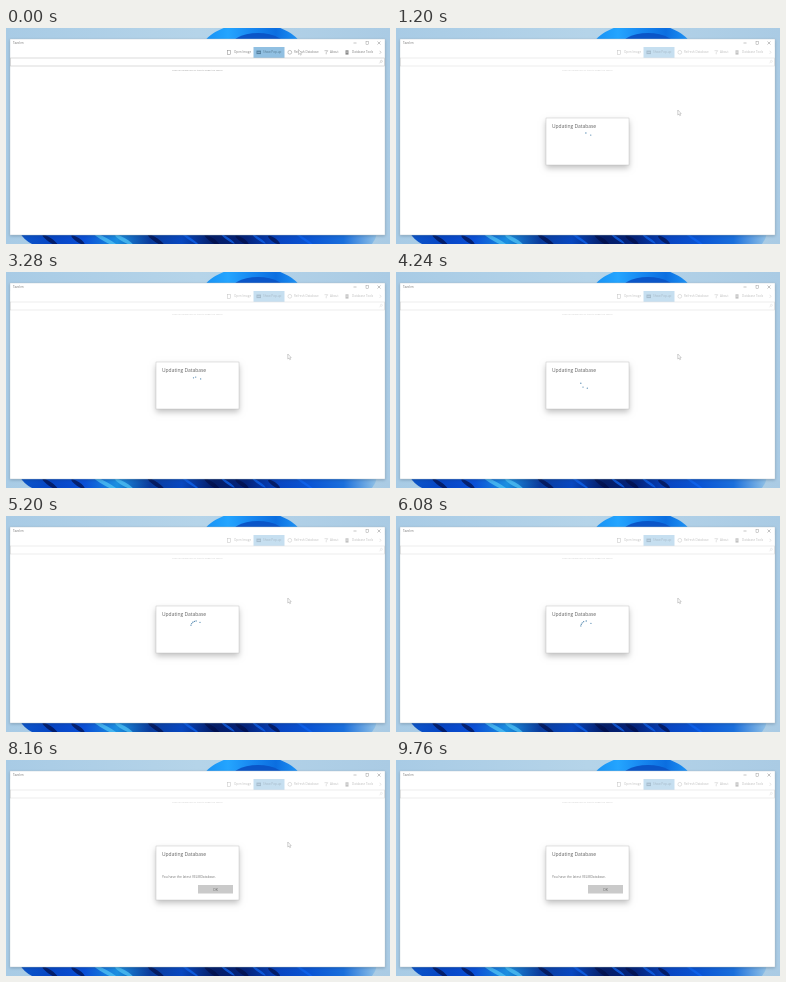
An HTML page with a canvas that plays this animation: 384x216 px, repeating every 9840 ms.

```html
<!DOCTYPE html>
<html lang="en">
<head>
<meta charset="utf-8">
<title>Database update</title>
<style>
html, body { margin: 0; width: 100%; height: 100%; overflow: hidden; }
canvas { display: block; width: 384px; height: 216px; }
</style>
</head>
<body>
<canvas id="stage" width="384" height="216"></canvas>
<script>
const ctx = document.getElementById("stage").getContext("2d");
const LOOP = 9840, STEP = 80;
const OPEN = 640, DONE = 7600, CURSOR_GONE = 9360;
const clamp = v => Math.max(0, Math.min(1, v));
const ease = v => v * v * (3 - 2 * v);
const mix = (a, b, v) => a + (b - a) * v;

// Linear track through [position, value] keys; null outside its range.
function track(keys, at) {
  const i = keys.findIndex(k => k[0] > at);
  if (i < 1) return null;
  const [p0, v0] = keys[i - 1], [p1, v1] = keys[i];
  return mix(v0, v1, (at - p0) / (p1 - p0));
}

function rect(x, y, w, h, color) {
  ctx.fillStyle = color;
  ctx.fillRect(x, y, w, h);
}

function box(x, y, w, h, color, width = 0.6) {
  ctx.strokeStyle = color;
  ctx.lineWidth = width;
  ctx.strokeRect(x, y, w, h);
}

function line(color, width, ...points) {
  ctx.beginPath();
  points.forEach(([x, y]) => ctx.lineTo(x, y));
  ctx.strokeStyle = color;
  ctx.lineWidth = width;
  ctx.stroke();
}

function ring(x, y, r, color, width) {
  ctx.beginPath();
  ctx.arc(x, y, r, 0, 7);
  ctx.strokeStyle = color;
  ctx.lineWidth = width;
  ctx.stroke();
}

function text(str, x, y, size, color, align = "left") {
  ctx.font = `${size}px "Open Sans", sans-serif`;
  ctx.textAlign = align;
  ctx.fillStyle = color;
  ctx.fillText(str, x, y);
}

function ellipse(x, y, rx, ry, tilt, fill) {
  ctx.beginPath();
  ctx.ellipse(x, y, rx, ry, tilt, 0, 7);
  ctx.fillStyle = fill;
  ctx.fill();
}

function gradient(x0, x1, colors) {
  const g = ctx.createLinearGradient(x0, 0, x1, 0);
  colors.forEach((c, i) => g.addColorStop(i / (colors.length - 1), c));
  return g;
}

function shadow(color, blur, dy) {
  ctx.shadowColor = color;
  ctx.shadowBlur = blur;
  ctx.shadowOffsetY = dy;
}

function wallpaper() {
  rect(0, 0, 384, 216, gradient(0, 384, ["#a8cbe5", "#b5d4e9", "#aacbe4"]));
  ellipse(246, 26, 52, 31, 0, gradient(198, 294, ["#1590f4", "#24a5ff", "#1787f0", "#0b6ee0", "#1f97f8"]));
  ellipse(252, 22, 30, 17, 0, "#0a55c8");
  ctx.save();
  ctx.beginPath();
  ctx.moveTo(14, 205);
  ctx.quadraticCurveTo(18, 212, 26, 216);
  ctx.lineTo(366, 216);
  ctx.quadraticCurveTo(370, 211, 371, 205);
  ctx.clip();
  rect(10, 205, 365, 11, gradient(14, 370, [
    "#0b55c9", "#0645c4", "#0a4fd6", "#1b8fe0", "#0a3c9c",
    "#0747c0", "#041c66", "#03237c", "#0845c2", "#0a55d4", "#1a6fdc", "#8fc0e6"
  ]));
  [[44, 9], [72, 8], [150, 10], [206, 9], [236, 8], [268, 7]].forEach(([x, w]) =>
    ellipse(x, 212, w, 2, 0.6, "rgba(2,14,70,.7)"));
  [[100, 14], [118, 10]].forEach(([x, w]) =>
    ellipse(x, 212, w, 2, 0.5, "rgba(80,195,245,.75)"));
  [[184, 10], [222, 8], [253, 8], [298, 14]].forEach(([x, w]) =>
    ellipse(x, 211, w, 1.2, 0.6, "rgba(15,100,240,.75)"));
  ctx.restore();
}

function icon(kind, x, y) {
  const c = "#888";
  if (kind === "page") {
    box(x + 0.7, y - 2, 3, 4.2, c, 0.5);
  } else if (kind === "panel") {
    rect(x, y - 1.7, 4.5, 3.5, "#537f9f");
    rect(x + 0.8, y - 0.4, 3, 0.7, "#9bc2df");
  } else if (kind === "refresh") {
    ring(x + 2, y, 1.9, c, 0.5);
  } else if (kind === "about") {
    line(c, 0.5, [x, y - 1.6], [x + 3.2, y - 1.6], [x + 1.7, y + 0.4], [x + 1.7, y + 2]);
  } else {
    rect(x + 0.5, y - 2, 3, 4.3, c);
    rect(x + 0.8, y - 0.5, 2.4, 0.5, "#fff");
  }
}

function appWindow(dim) {
  ctx.save();
  shadow("rgba(20,50,80,.3)", 3, 1);
  rect(4, 11, 375, 196, "#fff");
  ctx.restore();
  box(4, 11, 375, 196, "#b4c2ce", 0.4);
  text("Tavolen", 7, 16.2, 3, "#777");
  line("#888", 0.5, [347.5, 15], [350.5, 15]);
  box(360, 13.6, 2.6, 2.6, "#888", 0.4);
  line("#888", 0.5, [371.5, 13.5], [374.5, 16.5]);
  line("#888", 0.5, [374.5, 13.5], [371.5, 16.5]);

  rect(247.5, 19, 31, 11, "#91c0e2");
  [
    ["page", 221, "Open Image", 228],
    ["panel", 250.5, "Show Pop-up", 257],
    ["refresh", 281.8, "Refresh Database", 288],
    ["about", 318.5, "About", 324],
    ["database", 339, "Database Tools", 346]
  ].forEach(([kind, x, label, tx]) => {
    icon(kind, x, 24.3);
    text(label, tx, 25.4, 3, kind === "panel" ? "#54788f" : "#828282");
  });
  line("#999", 0.5, [373.7, 22.8], [375, 24.3], [373.7, 25.8]);
  box(4.5, 30, 374, 8, "#c4c4c4", 0.6);
  ring(375.4, 33.3, 1, "#aaa", 0.4);
  line("#aaa", 0.4, [374.6, 34], [373.4, 35.4]);
  text("Drop an image here or type to begin the search", 191.5, 43, 2.3, "#999", "center");
  rect(4.5, 19, 374, 187, `rgba(255,255,255,${0.48 * dim})`);
}

// Rotation of one spinner dot: [seconds, degrees from the top].
const DOT_TURN = [[0, -205], [0.433, -85], [1.2, -2], [1.617, 110], [2.017, 262], [2.783, 344], [3.05, 434]];
// Spinner clock: [stage ms, spinner seconds].
const SPIN_CLOCK = [[OPEN, 2.6], [1200, 3.65], [3280, 7.53], [5200, 9.46], [7040, 12.88], [DONE, 13.92]];
const SPIN_CYCLE = 4.052;

function spinner(t) {
  const phase = track(SPIN_CLOCK, t) % SPIN_CYCLE;
  for (let i = 0; i < 6; i++) {
    const angle = track(DOT_TURN, phase - i * 0.167);
    if (angle === null) continue;
    const a = angle * Math.PI / 180;
    ellipse(190.4 + 5.6 * Math.sin(a), 110.6 - 5.6 * Math.cos(a), 0.65, 0.65, 0, "#5388b0");
  }
}

function dialog(t, alpha) {
  const done = t >= DONE;
  const y = done ? 86 : 90, h = done ? 54 : 47;
  ctx.save();
  ctx.globalAlpha = alpha;
  shadow("rgba(0,0,0,.25)", 6, 2.5);
  rect(150, y, 83, h, "#fff");
  shadow("transparent", 0, 0);
  box(150, y, 83, h, "#bbb", 0.4);
  text("Updating Database", 156, y + 10, 4.95, "#626262");
  if (done) {
    text("You have the latest VELMDatabase.", 156, 118, 3.3, "#777");
    rect(192, 125, 35, 8.5, "#cacaca");
    text("OK", 209.5, 130.6, 3.6, "#666", "center");
  } else {
    spinner(t);
  }
  ctx.restore();
}

function cursor(t) {
  if (t >= CURSOR_GONE) return;
  const p = ease(clamp((t - 480) / 640));
  const x = mix(292.5, 281.8, p), y = mix(21.5, 82, p);
  ctx.beginPath();
  [[0, 0], [0, 5], [1.1, 4], [2, 5.7], [2.8, 5.3], [2, 3.7], [3.4, 3.6]]
    .forEach(([dx, dy]) => ctx.lineTo(x + dx, y + dy));
  ctx.closePath();
  ctx.fillStyle = "#fff";
  ctx.fill();
  ctx.strokeStyle = "#999";
  ctx.lineWidth = 0.45;
  ctx.stroke();
}

function draw(now) {
  const t = Math.floor(now % LOOP / STEP) * STEP;
  const shown = clamp((t - OPEN) / 240);
  wallpaper();
  appWindow(shown);
  if (shown) dialog(t, shown);
  cursor(t);
}

let start;
function tick(now) {
  start ??= now;
  draw(now - start);
  requestAnimationFrame(tick);
}
draw(0);
requestAnimationFrame(tick);
</script>
</body>
</html>
```
